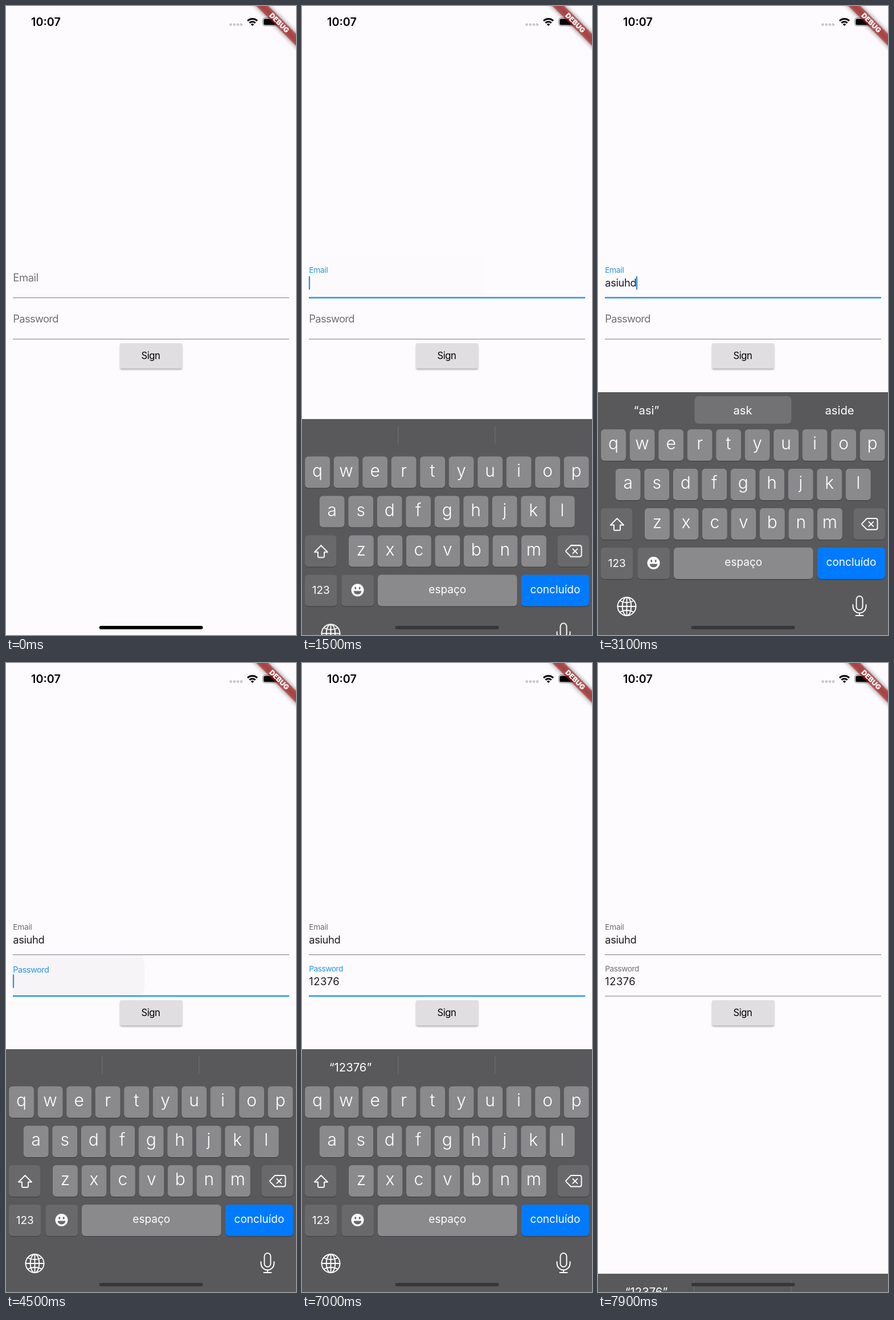
Animation of 509x1101 px, one loop 8000 ms. Source, as an HTML page:

```html
<!DOCTYPE html>
<html lang="pt">
<head>
<meta charset="utf-8">
<title>Sign in form</title>
<style>
html, body { margin: 0; width: 100%; height: 100%; overflow: hidden; background: #fdfbfe; }
svg { display: block; width: 509px; height: 1101px; font-family: Inter, Roboto, sans-serif; }
.mid { text-anchor: middle; }
.label, .value { font-size: 18.4px; }
.label { fill: #717073; letter-spacing: -.7px; }
.value { fill: #1c1b1d; letter-spacing: -.4px; }
#mailLabel { letter-spacing: -.4px; }
#passText { letter-spacing: .45px; }
.line { fill: #8e8c8f; }
.focus { fill: #2b96e8; }
.cursor { fill: #2b8fe0; }
.ink { fill: #000; fill-opacity: .035; opacity: 0; }
.key { fill: #8a898c; }
.dark { fill: #69686b; }
.blue { fill: #007aff; }
.shade { fill: #434245; }
.letter { font-size: 30px; font-weight: 300; }
.word { font-size: 19px; }
.hint { font-size: 20.3px; }
.icon { fill: none; stroke: #fff; stroke-width: 1.9; stroke-linejoin: round; stroke-linecap: round; }

#mailLabel { animation: mailFloat 8s infinite, mailTint 8s infinite; }
#passLabel { animation: passFloat 8s infinite, passTint 8s infinite; }
#mailFocus { animation: mailLine 8s infinite; }
#passFocus { animation: passLine 8s infinite; }
#mailInk { animation: ink 8s linear infinite; }
#passInk { animation: ink 8s 3.12s linear infinite; }
#keyboard { animation: slide 8s infinite; }
#home { animation: home 8s linear infinite; }
#done { animation: done 8s step-end infinite; }
#mailLabel, #passLabel, #mailFocus, #passFocus { animation-timing-function: cubic-bezier(.4, 0, .2, 1); }

@keyframes mailFloat {
  0%, 16.2% { transform: none; }
  18.7%, 100% { transform: translateY(-15px) scale(.75); }
}
@keyframes passFloat {
  0%, 54.9% { transform: none; }
  57.4%, 100% { transform: translateY(-14.5px) scale(.75); }
}
@keyframes mailTint {
  0%, 16.2%, 56.2%, 100% { fill: #717073; }
  18.2%, 54.6% { fill: #2b96e8; }
}
@keyframes passTint {
  0%, 54.6%, 98.5%, 100% { fill: #717073; }
  56.2%, 96.2% { fill: #2b96e8; }
}
@keyframes mailLine {
  0%, 16.2%, 56.2%, 100% { opacity: 0; }
  18.2%, 54.6% { opacity: 1; }
}
@keyframes passLine {
  0%, 54.6%, 98.5%, 100% { opacity: 0; }
  56.2%, 96.2% { opacity: 1; }
}
@keyframes ink {
  0%, 14.99% { opacity: 0; transform: scale(.03); }
  15% { opacity: 1; transform: scale(.03); }
  17% { opacity: 1; }
  19.2%, 100% { opacity: 0; transform: scale(1); }
}
/* critically damped spring */
@keyframes slide {
  0%, 16.41%, 96.11% {
    animation-timing-function: linear(0, .03 4.2%, .099 8.3%, .287, .474, .63, .748, .834, .894, .935, .962, .981, .992, 1);
  }
  0%, 16.41% { transform: translateY(425px); }
  20.3%, 96.11% { transform: none; }
  100% { transform: translateY(421px); }
}
@keyframes home {
  0%, 16.6% { fill: #000; }
  18.5%, 100% { fill: #37363a; }
}
@keyframes done {
  0% { opacity: 1; }
  96.11%, 100% { opacity: 0; }
}
</style>
</head>
<body>
<svg viewBox="0 0 509 1101">
  <defs>
    <clipPath id="mailBox"><path d="M12 440h485v71H12z"/></clipPath>
    <clipPath id="passBox"><path d="M12 512h485v71H12z"/></clipPath>
    <filter id="soft" x="-20%" y="-200%" width="140%" height="500%"><feGaussianBlur stdDeviation="4.5"/></filter>
    <filter id="lift" x="-10%" y="-20%" width="120%" height="150%"><feGaussianBlur stdDeviation="1.5"/></filter>
  </defs>
  <rect width="509" height="1101" fill="#fdfbfe"/>

  <!-- status bar -->
  <text class="mid" x="70" y="35" font-size="19.8" font-weight="600">10:07</text>
  <g fill="#c5c3c6">
    <circle cx="394.5" cy="32.5" r="2.3"/><circle cx="400.8" cy="32.5" r="2.3"/>
    <circle cx="407" cy="32.5" r="2.3"/><circle cx="413" cy="32.5" r="2.3"/>
  </g>
  <g fill="none" stroke="#000" stroke-width="3">
    <path d="M424 26a12 12 0 0 1 17 0M427.3 29.6a7.4 7.4 0 0 1 10.4 0"/>
    <path d="M429.8 32.2a3.8 3.8 0 0 1 5.4 0l-2.7 2.7z" fill="#000" stroke="none"/>
  </g>
  <rect x="450.6" y="20.8" width="29" height="14" rx="4" fill="none" stroke="#8b898c" stroke-width="1.1"/>
  <rect x="452.2" y="22.4" width="25.8" height="10.8" rx="2.5"/>
  <path d="M481 25.6q2 2.2 0 4.4z" fill="#8b898c"/>

  <!-- fields -->
  <g clip-path="url(#mailBox)"><g transform="translate(60 476)"><circle id="mailInk" class="ink" r="290"/></g></g>
  <g clip-path="url(#passBox)"><g transform="translate(84 548)"><circle id="passInk" class="ink" r="290"/></g></g>
  <g transform="translate(12.3 482)"><text id="mailLabel" class="label">Email</text></g>
  <g transform="translate(12.3 554)"><text id="passLabel" class="label">Password</text></g>
  <text id="mailText" class="value" x="12.3" y="491.3"></text>
  <text id="passText" class="value" x="12.3" y="563.5"></text>
  <rect id="mailCursor" class="cursor" y="473" width="2.2" height="23.5"/>
  <rect id="passCursor" class="cursor" y="545.2" width="2.2" height="23.5"/>
  <rect class="line" x="12" y="510" width="485" height="1.2"/>
  <rect class="line" x="12" y="582.5" width="485" height="1.2"/>
  <rect id="mailFocus" class="focus" x="12" y="509.3" width="485" height="2.5"/>
  <rect id="passFocus" class="focus" x="12" y="581.7" width="485" height="2.5"/>

  <rect x="200.5" y="592.5" width="108.5" height="44" rx="2.5" opacity=".32" filter="url(#lift)"/>
  <rect x="200" y="590.3" width="109.3" height="44.3" rx="2.5" fill="#e0dee1"/>
  <text class="mid" x="254" y="618.3" font-size="16.6" font-weight="430" letter-spacing="-.4">Sign</text>

  <!-- debug ribbon -->
  <g transform="translate(509 0) rotate(45)">
    <rect x="-60" y="34.4" width="120" height="14.8" opacity=".5" filter="url(#soft)"/>
    <rect x="-60" y="34.4" width="120" height="14.8" fill="#b71c1c" opacity=".627"/>
    <text class="mid" y="46.2" font-size="12.4" font-weight="900" fill="#fff">DEBUG</text>
  </g>

  <g id="keyboard" fill="#fff">
    <rect y="676" width="509" height="425" fill="#59585a"/>
    <path id="dividers" d="M168.7 688v31M338.7 688v31" stroke="#706f72" stroke-width="1.2"/>
    <rect id="pick" x="169.5" y="683" width="170" height="48" rx="7" fill="#727174"/>
    <text class="hint mid" x="85" y="715.2"></text>
    <text class="hint mid" x="254" y="715.2"></text>
    <text class="hint mid" x="424" y="715.2"></text>
    <g id="keys"></g>
    <g class="icon">
      <path d="M33.5 897l-11.5 11.5h6v8q0 1.2 1.2 1.2h8.6q1.2 0 1.2-1.2v-8h6z"/>
      <path d="M472 897h15.5a3 3 0 0 1 3 3v13.5a3 3 0 0 1-3 3H472l-8.6-8.7q-.8-1 0-2zM475.3 902.8l8 8m0-8l-8 8"/>
      <circle cx="50.5" cy="1051" r="16"/>
      <ellipse cx="50.5" cy="1051" rx="7.8" ry="16"/>
      <path d="M50.5 1035v32M34.5 1051h32M38 1041q12.5 6.5 25 0M38 1061q12.5-6.5 25 0"/>
      <rect x="453.5" y="1033" width="11" height="24" rx="5.5"/>
      <path d="M447.5 1048v3a11.5 11.5 0 0 0 23 0v-3M459 1062.5v4.5M452.5 1067h13"/>
    </g>
    <circle cx="97.5" cy="975" r="11"/>
    <g fill="#69686b">
      <ellipse cx="93.8" cy="971.5" rx="1.5" ry="2.2"/><ellipse cx="101.2" cy="971.5" rx="1.5" ry="2.2"/>
      <path d="M90.5 976.5h14q-1 6-7 6t-7-6z"/>
    </g>
  </g>
  <rect id="home" x="163.7" y="1085" width="181.8" height="6" rx="3"/>
</svg>
<script>
const $ = id => document.getElementById(id);
const LOOP = 8000, LEFT = 12.3;

// Keyboard
const key = (x, y, w, text = '', type = 'letter', tone = '') => {
  const base = y + (type === 'letter' ? 35.3 : text === '123' ? 34 : 32.3);
  const box = (dy, cls) => `<rect class="${cls}" x="${x}" y="${y + dy}" width="${w}" height="55" rx="6"/>`;
  return box(1.3, 'shade') + box(0, 'key ' + tone) +
    `<text class="mid ${type}" x="${x + w / 2}" y="${base}">${text}</text>`;
};
const row = (letters, x, y) =>
  [...letters].map((c, i) => key(x + i * 50.5, y, 43.8, c)).join('');

$('keys').innerHTML =
  row('qwertyuiop', 5.2, 741) + row('asdfghjkl', 30.8, 810) + row('zxcvbnm', 82, 879) +
  key(5, 879, 55.5, '', 'word', 'dark') + key(448.5, 879, 55.5, '', 'word', 'dark') +
  key(5, 948, 56.5, '123', 'word', 'dark') + key(69.3, 948, 57, '', 'word', 'dark') +
  key(133, 948, 244.5, 'espaço', 'word') + key(385, 948, 119, 'retorno', 'word', 'dark') +
  `<g id="done">${key(385, 948, 119, 'concluído', 'word', 'blue')}</g>`;

// Typing
const fields = [
  { name: 'mail', text: 'asiuhd', from: 1310, to: 4390, times: [2600, 2690, 2790, 2900, 2990, 3080] },
  { name: 'pass', text: '12376', from: 4400, to: 7740, times: [5650, 5750, 5850, 5960, 6250] }
];
const hints = [
  [0, '', '', ''],
  [2900, '“asi”', 'ask', 'aside'],
  [3400, '“asiuhd”', '', ''],
  [4390, '', '', ''],
  [5900, '“123”', '', ''],
  [6450, '“12376”', '', '']
];
const slots = document.querySelectorAll('.hint');

// On for half a second, then fades out and in by turns
const blink = dt => {
  const p = dt % 1000;
  if (p >= 500) return Math.max(0, 1 - (p - 500) / 250);
  return dt < 500 ? 1 : Math.min(1, p / 250);
};
const setText = (el, text) => { if (el.textContent !== text) el.textContent = text; };

function drawField({ name, text, from, to, times }, t) {
  const done = times.filter(at => at <= t);
  const value = $(name + 'Text'), cursor = $(name + 'Cursor');
  setText(value, text.slice(0, done.length));
  const width = done.length ? value.getComputedTextLength() : 0;
  cursor.setAttribute('x', LEFT + width - .4);
  cursor.style.opacity = t >= from && t < to ? blink(t - (done.at(-1) ?? from)) : 0;
}

function draw(t) {
  fields.forEach(f => drawField(f, t));
  const [, ...words] = hints.findLast(h => h[0] <= t);
  words.forEach((w, i) => setText(slots[i], w));
  $('pick').style.opacity = words[1] ? 1 : 0;
  $('dividers').style.opacity = words[1] ? 0 : 1;
}

const start = performance.now();
function tick() {
  draw((performance.now() - start) % LOOP);
  requestAnimationFrame(tick);
}
tick();
</script>
</body>
</html>
```
